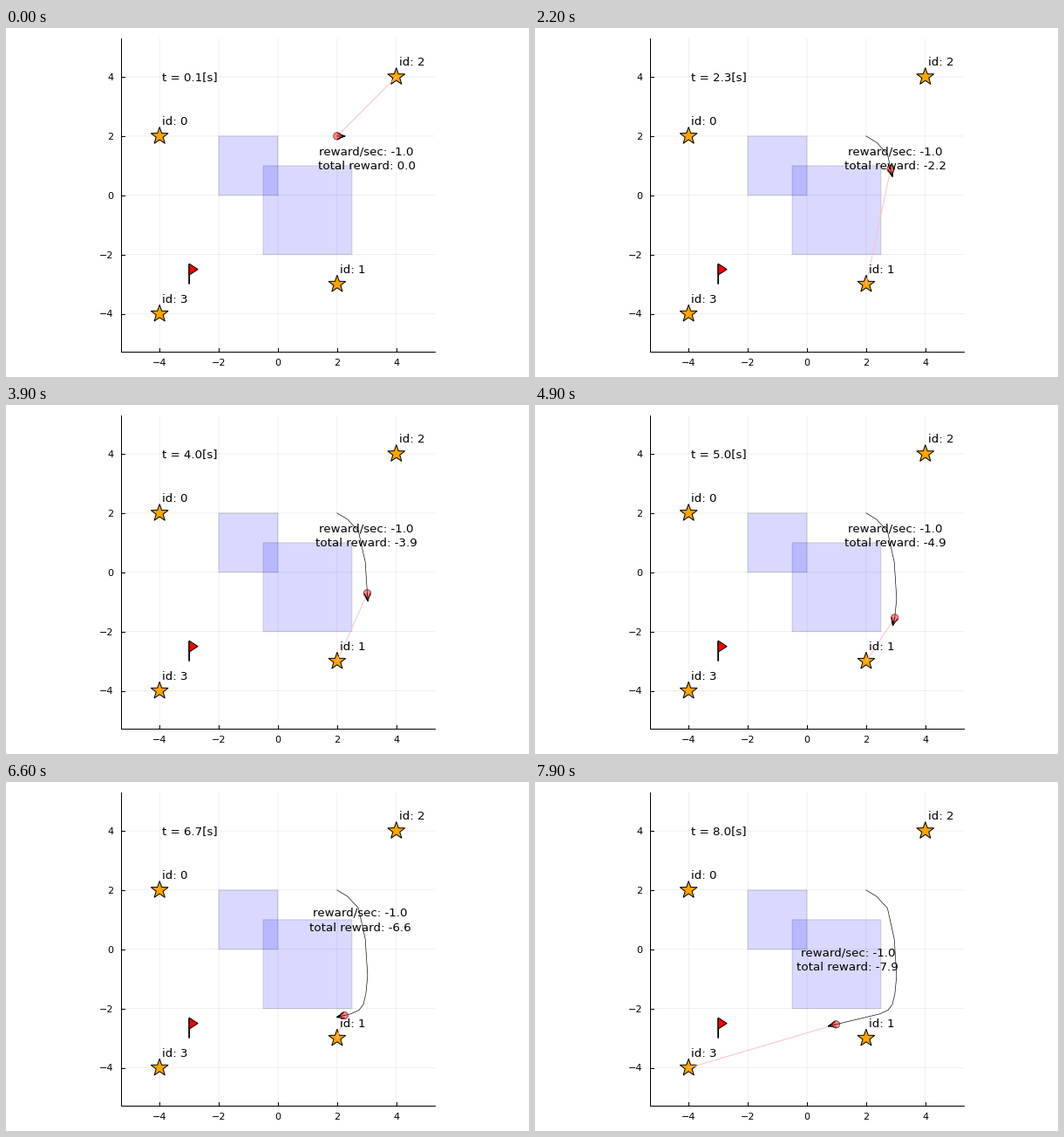
A matplotlib script that plays this animation: 600 px wide and 400 px high, repeating every 8000 ms.

```python
import numpy as np
import matplotlib.pyplot as plt
from matplotlib.animation import FuncAnimation
from matplotlib.patches import Circle, Polygon, Rectangle

W, H, DPI = 600, 400, 100
FRAMES, STEP_MS = 80, 100
PT = 72 / DPI  # points per pixel
UNIT = 33.95   # pixels per world unit

plt.rcParams["font.family"] = "DejaVu Sans"
fig = plt.figure(figsize=(W / DPI, H / DPI), dpi=DPI, facecolor="white")
ax = fig.add_axes([0, 0, 1, 1])
ax.set_xlim(0, W)
ax.set_ylim(H, 0)
ax.axis("off")

LEFT, RIGHT, TOP, BOTTOM = 132, 492, 12, 371
STARS = [(-4, 2), (2, -3), (4, 4), (-4, -4)]
PUDDLES = [(-2, 0, 2, 2), (-0.5, -2, 3, 3)]
GOAL = (-3, -3)
VIEW_RANGE, VIEW_ANGLE = (0.5, 6.0), 60

# the robot turns on the spot toward each waypoint, then drives to it
SPEED, TURN = 0.1, 10.5  # units and degrees per step
ROUTE = [(2, 2), (2.355, 1.785), (2.72, 1.39), (2.95, 0.35), (3.03, -0.89),
         (2.97, -1.51), (2.885, -1.86), (2.74, -2.05), (2.46, -2.18),
         (0.91, -2.55)]
LABEL_START = 64


def to_px(x, y):
    return 312 + UNIT * x, 191.8 - UNIT * y


def drive(route):
    """Return x, y and heading for every step."""
    keys = [(0, *route[0], 0)]
    for x, y in route[1:]:
        t, x0, y0, old = keys[-1]
        new = -(np.degrees(np.arctan2(y0 - y, x - x0)) % 360)
        t += abs(new - old) / TURN
        keys.append((t, x0, y0, new))
        t += np.hypot(x - x0, y - y0) / SPEED
        keys.append((t, x, y, new))
    t, *cols = np.array(keys).T
    return [np.interp(np.arange(FRAMES), t, c) for c in cols]


def line(x, y, color="black", width=1.0, **kw):
    return ax.plot(x, y, color=color, lw=width * PT, **kw)[0]


def label(x, y, s, size=13.4, **kw):
    return ax.text(x, y, s, fontsize=size * PT, va="baseline", zorder=8, **kw)


def draw_axes():
    grid = dict(width=0.6, alpha=0.1, zorder=1, snap=False)
    for v in range(-4, 5, 2):
        px, py = to_px(v, v)
        line([px, px], [TOP, BOTTOM], **grid)
        line([LEFT, RIGHT], [py, py], **grid)
        line([px, px], [BOTTOM, BOTTOM - 4], zorder=2)
        line([LEFT, LEFT + 4], [py, py], zorder=2)
        name = str(v).replace("-", "\u2212")
        label(px, 386.7, name, 11.1, ha="center")
        label(123.5, py + 3.8, name, 11.1, ha="right")
    line([LEFT, LEFT, RIGHT], [TOP, BOTTOM, BOTTOM], zorder=2)


def draw_star(i, x, y):
    px, py = to_px(x, y)
    a = np.arange(10) * np.pi / 5
    r = np.where(np.arange(10) % 2, 4.15, 10.4)
    pts = np.column_stack([px + r * np.sin(a), py - r * np.cos(a)])
    ax.add_patch(Polygon(pts, fc="orange", ec="black", lw=PT, zorder=4))
    lx, ly = to_px(x + 0.1, y + 0.5)
    label(lx - 0.6, ly + 4.4, f"id: {i}")


def draw_world():
    for x, y, w, h in PUDDLES:
        (x0, y0), (x1, y1) = to_px(x, y), to_px(x + w, y + h)
        ax.add_patch(Rectangle((x0, y1), x1 - x0, y0 - y1, fc=(0, 0, 1, 0.15),
                               ec=(0, 0, 0, 0.15), lw=PT, zorder=3, snap=False))
    gx, gy = to_px(*GOAL)
    line([gx, gx], [gy, gy - 23], width=1.8, zorder=4,
         solid_capstyle="butt", snap=False)
    flag = [(gx, gy - 23.5), (gx + 10, gy - 17), (gx, gy - 10.5)]
    ax.add_patch(Polygon(flag, fc="red", ec="black", lw=PT, zorder=4))
    for i, (x, y) in enumerate(STARS):
        draw_star(i, x, y)


def sees(x, y, heading, star):
    dx, dy = star[0] - x, star[1] - y
    off = (np.degrees(np.arctan2(dy, dx)) - heading + 180) % 360 - 180
    near, far = VIEW_RANGE
    return near <= np.hypot(dx, dy) <= far and abs(off) <= VIEW_ANGLE


draw_axes()
draw_world()
xs, ys, headings = drive(ROUTE)
trail_x, trail_y = to_px(xs, ys)

rays = [line([], [], "pink", zorder=5) for _ in STARS]
trail = line([], [], width=0.65, zorder=5)
arrow = line([], [], zorder=6)
body = ax.add_patch(Circle((0, 0), 4.3, fc=(1, 0, 0, 0.45),
                           ec=(0, 0, 0, 0.6), lw=0.8 * PT, zorder=7))
clock = label(179.2, 60.4, "")
rate = label(0, 0, "reward/sec: -1.0", ha="center")
total = label(0, 0, "", ha="center")


def update(i):
    px, py = trail_x[i], trail_y[i]
    for ray, star in zip(rays, STARS):
        seen = sees(xs[i], ys[i], headings[i], star)
        sx, sy = to_px(*star)
        ray.set_data([px, sx] if seen else [], [py, sy] if seen else [])

    trail.set_data(trail_x[:i + 1], trail_y[:i + 1])
    body.center = px, py
    a = np.radians(headings[i])
    along = np.array([0, 9, 0.5, 9, 0.5])
    side = np.array([0, 0, 3.2, 0, -3.2])
    arrow.set_data(px + along * np.cos(a) + side * np.sin(a),
                   py - along * np.sin(a) + side * np.cos(a))

    # the reward label rests, then drifts down and left
    s = max(0, i - LABEL_START)
    tx, ty = 413.6 - 3.65 * s, 145.5 + (4.28 - 0.0455 * s) * s
    rate.set_position((tx, ty))
    total.set_position((tx, ty + 17))
    total.set_text(f"total reward: {-i / 10:.1f}")
    clock.set_text(f"t = {(i + 1) / 10:.1f}[s]")
    return [*rays, trail, body, arrow, clock, rate, total]


anim = FuncAnimation(fig, update, frames=FRAMES, interval=STEP_MS,
                     repeat=True, repeat_delay=0, blit=False)
plt.show()
```
